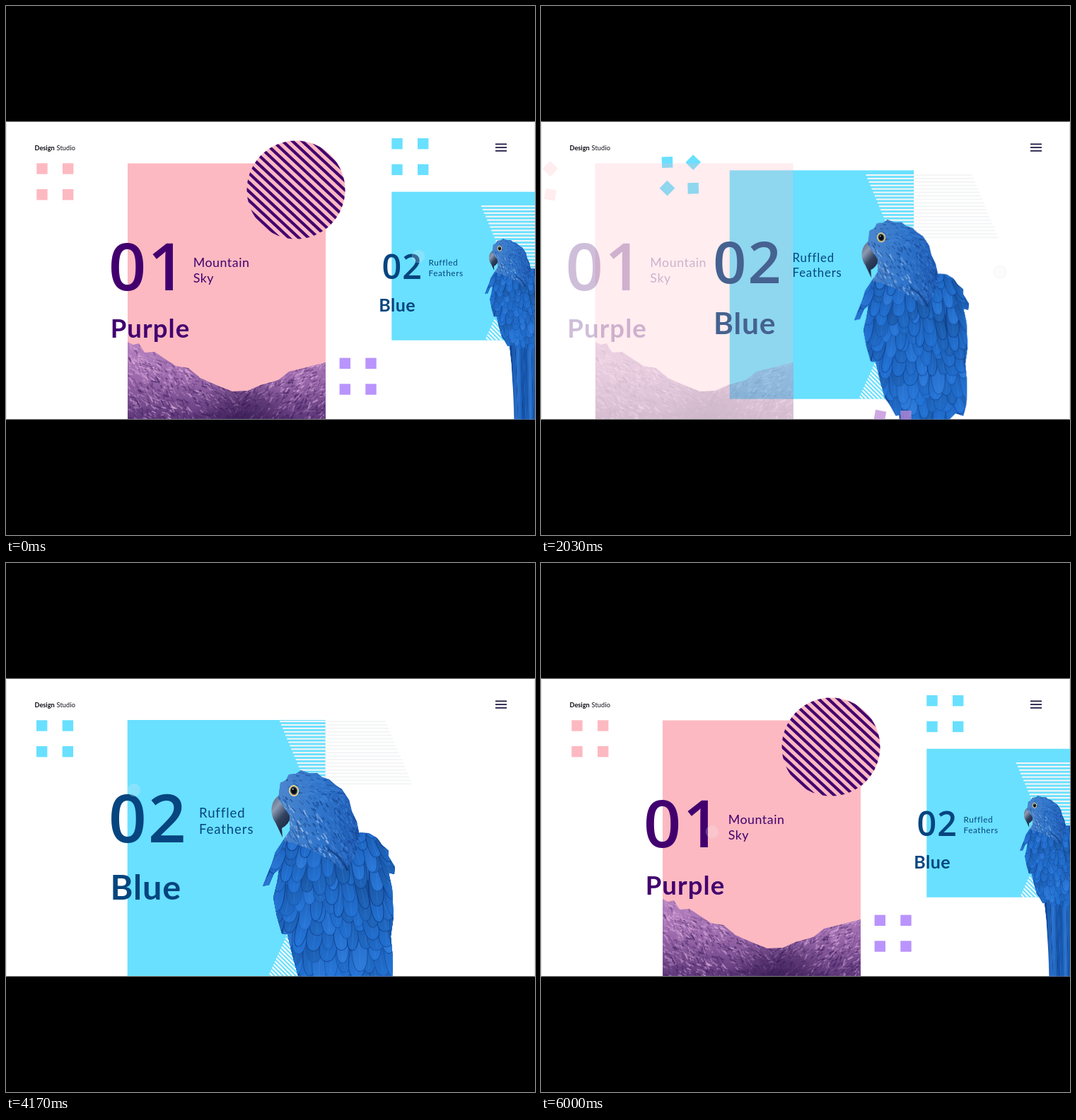
These frames come from a looping animation (748 px wide and 748 px high, 6030 ms). An HTML page with a canvas:

```html
<!DOCTYPE html>
<html lang="en">
<head>
<meta charset="utf-8">
<title>Colour slides</title>
<style>
html, body { margin: 0; width: 100%; height: 100%; overflow: hidden; background: #000 }
canvas { display: block }
</style>
</head>
<body>
<canvas id="stage" width="748" height="748"></canvas>
<script>
const ctx = document.getElementById('stage').getContext('2d');
const LOOP = 6030, MOVE = 1319;
const PINK = '#fdb9c1', CYAN = '#69e0ff', PURPLE = '#42006f', NAVY = '#06457f';

const clamp = v => Math.max(0, Math.min(1, v));
const mix = (a, b, k) => a + (b - a) * k;
const ease = u => u < .5 ? 8 * u ** 4 : 1 - 8 * (1 - u) ** 4;

function seeded(seed) {
  return () => {
    seed = (seed * 1664525 + 1013904223) % 4294967296;
    return seed / 4294967296;
  };
}

function picture(w, h, draw) {
  const c = document.createElement('canvas');
  c.width = w;
  c.height = h;
  draw(c.getContext('2d'));
  return c;
}

function polygon(g, pts) {
  g.beginPath();
  for (let i = 0; i < pts.length; i += 2) g.lineTo(pts[i], pts[i + 1]);
  g.closePath();
}

function line(g, x1, y1, x2, y2) {
  g.beginPath();
  g.moveTo(x1, y1);
  g.lineTo(x2, y2);
  g.stroke();
}

function ramp(g, x1, y1, x2, y2, ...colors) {
  const r = g.createLinearGradient(x1, y1, x2, y2);
  colors.forEach((c, i) => r.addColorStop(i / (colors.length - 1), c));
  return r;
}

const mountain = picture(280, 112, g => {
  const rnd = seeded(7);
  const ridge = [0,3, 8,7, 16,5, 24,18, 38,17, 53,27, 68,37, 86,40, 103,54, 123,63, 148,73,
    170,72, 188,64, 213,57, 228,45, 253,39, 268,35, 280,32];
  polygon(g, [...ridge, 280, 113, 0, 113]);
  g.clip();
  g.fillStyle = ramp(g, 0, 0, 0, 113, '#b884c0', '#9a68ab', '#5d3779');
  g.fillRect(0, 0, 280, 113);
  for (let i = 0; i < 2000; i++) {
    const x = rnd() * 280, y = rnd() * 113, len = 2 + rnd() * 8;
    const side = x < 155 ? 1 : -1;
    const shade = y / 113 * .5 + .35 - Math.abs(x - 165) / 700;
    const a = .15 + rnd() * .4;
    g.strokeStyle = rnd() < shade ? `rgba(58,28,88,${a})` : `rgba(229,180,226,${a})`;
    g.lineWidth = .6 + rnd() * 1.8;
    const tilt = .1 + rnd() * 1.2;
    line(g, x, y, x + side * len * Math.cos(tilt), y + len * Math.sin(tilt));
  }
  const dark = g.createRadialGradient(165, 125, 5, 165, 125, 75);
  dark.addColorStop(0, 'rgba(48,22,75,.75)');
  dark.addColorStop(1, 'rgba(48,22,75,0)');
  g.fillStyle = dark;
  g.fillRect(0, 0, 280, 113);
});

const parrot = picture(190, 560, g => {
  const rnd = seeded(21);
  // tail
  polygon(g, [70,290, 79,372, 85,470, 88,560, 157,560, 156,470, 152,372, 158,290]);
  g.fillStyle = ramp(g, 78, 0, 156, 0, '#0f489c', '#2a74d0', '#1250a6', '#2a74d0', '#0d4290');
  g.fill();
  for (let i = 0; i < 9; i++) {
    g.strokeStyle = i % 2 ? 'rgba(8,35,90,.6)' : 'rgba(80,150,225,.45)';
    line(g, 82 + i * 8, 300, 92 + i * 7.5, 560);
  }
  // beak
  g.beginPath();
  g.moveTo(26, 34);
  g.bezierCurveTo(12, 40, 8, 60, 18, 74);
  g.lineTo(28, 95);
  g.lineTo(27, 82);
  g.quadraticCurveTo(38, 76, 40, 64);
  g.lineTo(40, 40);
  g.fillStyle = ramp(g, 10, 42, 42, 70, '#5a6a85', '#8c9bb2', '#33435f', '#1c2c49');
  g.fill();
  g.save();
  polygon(g, [22,40, 25,18, 33,14, 37,6, 47,5, 54,0, 65,4, 77,4, 84,10, 94,13, 103,21, 112,27,
    122,42, 126,58, 133,73, 136,88, 150,89, 162,96, 168,105, 178,114, 178,122, 187,137, 186,147,
    178,145, 183,167, 185,207, 181,235, 184,265, 183,300, 178,320, 165,316, 154,327, 143,326,
    129,331, 116,322, 100,329, 84,316, 68,320, 58,302, 50,291, 42,262, 35,232, 27,231, 20,207,
    15,180, 20,160, 23,140, 16,146, 9,162, 0,164, 13,132, 18,116, 29,99, 38,86, 38,64, 29,50]);
  g.clip();
  g.fillStyle = ramp(g, 0, 0, 60, 330, '#2c6fc4', '#2168c6', '#1a5ab4');
  g.fillRect(0, 0, 190, 340);
  // wing feathers, lower rows first
  for (let y = 300; y > 82; y -= 15) {
    const k = (y - 82) / 218;
    for (let x = rnd() * 16; x < 196; x += 14 + rnd() * 10) {
      const w = (10 + k * 4) * (.8 + rnd() * .4), len = (30 + k * 46) * (.75 + rnd() * .5);
      g.save();
      g.translate(x, y + rnd() * 16 - 8);
      g.rotate((95 - x) / 95 * (.5 - k * .5) + (rnd() - .5) * .35);
      g.beginPath();
      g.moveTo(-w * .6, -len * .5);
      g.bezierCurveTo(-w, len * .2, -w * .8, len * .5, 0, len * .5);
      g.bezierCurveTo(w * .8, len * .5, w, len * .2, w * .6, -len * .5);
      const l = 40 + rnd() * 10;
      g.fillStyle = ramp(g, -w, -len / 2, w, len / 2, `hsl(214 74% ${l - 7}%)`, `hsl(213 72% ${l + 3}%)`);
      g.fill();
      g.strokeStyle = `rgba(10,45,115,${.15 + rnd() * .5})`;
      g.lineWidth = 1.1;
      g.stroke();
      g.strokeStyle = 'rgba(100,165,235,.2)';
      line(g, 0, -len * .3, 0, len * .42);
      g.restore();
    }
  }
  // head and neck down
  const neck = () => {
    g.beginPath();
    g.moveTo(20, 0);
    g.lineTo(140, 0);
    g.lineTo(138, 92);
    g.quadraticCurveTo(130, 135, 112, 140);
    g.quadraticCurveTo(65, 105, 28, 100);
    g.closePath();
  };
  neck();
  g.fillStyle = ramp(g, 30, 60, 135, 60, '#4a84cc', '#2f74cb', '#1d59b2');
  g.fill();
  g.save();
  neck();
  g.clip();
  for (let i = 0; i < 800; i++) {
    const x = 20 + rnd() * 118, y = rnd() * 140;
    const pale = y > 42 && x < 75 + (y - 42) * .3;
    const tone = rnd();
    g.strokeStyle = tone < .4 ? 'rgba(14,58,130,.5)'
      : pale && tone > .65 ? 'rgba(195,215,238,.55)' : 'rgba(70,140,222,.5)';
    g.lineWidth = .8 + rnd() * 1.2;
    const dir = y < 35 ? .2 : .8 + rnd() * .4;
    const len = 3 + rnd() * 5;
    line(g, x, y, x + len * Math.cos(dir), y + len * Math.sin(dir));
  }
  g.restore();
  g.strokeStyle = 'rgba(8,32,85,.5)';
  g.lineWidth = 3;
  g.beginPath();
  g.moveTo(92, 112);
  g.quadraticCurveTo(110, 120, 120, 142);
  g.stroke();
  g.restore();
  // eye
  for (const [rx, ry, color] of [[7, 8, '#ead98a'], [5.2, 6, '#46515c'], [3.8, 4.6, '#060b18']]) {
    g.beginPath();
    g.ellipse(44, 29, rx, ry, -.2, 0, 7);
    g.fillStyle = color;
    g.fill();
  }
  g.fillStyle = '#fff';
  g.fillRect(42, 26, 1.5, 1.5);
});

function text(str, x, y, size, color, weight = 400, spacing = 0, family = 'Lato') {
  ctx.font = `${weight} ${size}px "${family}", sans-serif`;
  ctx.letterSpacing = spacing * size + 'px';
  ctx.fillStyle = color;
  ctx.fillText(str, x, y);
}
const digits = (str, x, y, size, color) => text(str, x - size * .032, y, size, color, 600, .025, 'Open Sans');

// four squares around fixed centres, each with its own turn in degrees
function squares(x, y, color, turns, p) {
  ctx.fillStyle = color;
  turns.forEach((turn, i) => {
    ctx.save();
    ctx.translate(x + i % 2 * 36.7, y + (i >> 1) * 36.7);
    ctx.rotate(turn * p * Math.PI / 180);
    ctx.fillRect(-7.7, -7.7, 15.4, 15.4);
    ctx.restore();
  });
}

function blueSlide(p) {
  const x = mix(545.3, 171.7, p), y = mix(262.7, 222, p), w = mix(203, 280, p), h = mix(210, 362, p);
  const s = mix(.476, 1, p);
  ctx.fillStyle = CYAN;
  ctx.fillRect(x, y, w, h);
  squares(mix(553, 50.7, p), mix(194.7, 230, p), CYAN, [360, 180, 180, 360], p);

  ctx.fillStyle = '#f4f5f6';
  const lx = mix(672, 387, p), ly = mix(282, 223, p);
  for (let d = 0; d < 89; d += 4.9) ctx.fillRect(lx + d * .42, ly + d, 150, 2.1);

  const tx = mix(677, 371, p), ty = y + h;
  ctx.save();
  polygon(ctx, [tx, ty, tx + 29 * s, ty - 64 * s, tx + 75 * s, ty]);
  ctx.clip();
  ctx.strokeStyle = '#fff';
  ctx.lineWidth = 2;
  for (let d = -70; d < 80; d += 6) line(ctx, tx + d, ty - 70, tx + d + 70, ty);
  ctx.restore();

  digits('02', mix(533, 148, p), mix(385.5, 394.5, p), mix(48.5, 94, p), NAVY);
  text('Blue', mix(527.3, 147.5, p), mix(431.5, 475.5, p), mix(25, 48.5, p), NAVY, 700, .02);
  const size = mix(11.8, 18.5, p), fx = mix(597.4, 273, p), fy = mix(366.5, 360, p);
  text('Ruffled', fx, fy, size, NAVY, 400, .05);
  text('Feathers', fx, fy + mix(15, 23, p), size, NAVY, 400, .05);

  ctx.drawImage(parrot, mix(677, 363, p), mix(329, 293, p), 190 * s, 560 * s);
}

function disc(p) {
  const k = 1 - p;
  ctx.save();
  ctx.globalAlpha = clamp(Math.min(k, (.74 - p) * 3));
  ctx.translate(mix(410, 447, p), mix(260, 583, p));
  ctx.scale(k, k);
  ctx.beginPath();
  ctx.arc(0, 0, 69.5, 0, 7);
  ctx.clip();
  ctx.fillStyle = PINK;
  ctx.fillRect(-70, -70, 140, 140);
  ctx.rotate(.75);
  ctx.fillStyle = PURPLE;
  for (let y = -68; y < 70; y += 9.4) ctx.fillRect(-70, y, 140, 4.2);
  ctx.restore();
}

function purpleSlide(p) {
  const x = 172 - 128 * p, shift = -148 * p;
  ctx.globalAlpha = 1 - p;
  ctx.fillStyle = PINK;
  ctx.fillRect(x, 222.5, 280, 361.5);
  ctx.drawImage(mountain, x, 472);
  squares(51 - 100 * p, 230, PINK, [45, 180, 180, 135], p);
  digits('01', 148 + shift, 401.5, 93, PURPLE);
  text('Purple', 147.7 + shift, 468.5, 36.5, PURPLE, 700, .03);
  text('Mountain', 264.7 + shift, 369, 17.8, PURPLE, 400, .03);
  text('Sky', 264.7 + shift, 391, 17.8, PURPLE, 400, .03);
  ctx.globalAlpha = 1;
  disc(p);
  const k = clamp(p * 2.5 - .2);
  const violet = `rgba(${mix(185, 191, k)},${mix(148, 139, k)},${mix(252, 216, k)},${mix(1, .75, k)})`;
  squares(479.3, 505.3 + 100 * p, violet, [135, 0, 0, 135], p);
}

// time, x, y of the pointer
const trail = [[0, 583, 354], [900, 649, 376], [3100, 649, 376], [4170, 181, 321],
  [4700, 77, 254], [5300, 77, 254], [5950, 242, 380], [LOOP, 242, 380]];

function pointer(t) {
  const i = trail.findIndex(k => k[0] > t);
  const [a, b] = [trail[i - 1], trail[i]];
  const u = (t - a[0]) / (b[0] - a[0]), k = u * u * (3 - 2 * u);
  ctx.beginPath();
  ctx.arc(mix(a[1], b[1], k), mix(a[2], b[2], k), 8.7, 0, 7);
  ctx.fillStyle = 'rgba(235,235,240,.22)';
  ctx.fill();
  ctx.strokeStyle = 'rgba(215,215,225,.25)';
  ctx.lineWidth = 1;
  ctx.stroke();
}

function frame(now) {
  const t = now % LOOP;
  const p = t < 4000 ? ease(clamp((t - 1269) / MOVE)) : 1 - ease(clamp((t - 4568) / MOVE));
  ctx.fillStyle = '#000';
  ctx.fillRect(0, 0, 748, 748);
  ctx.save();
  ctx.beginPath();
  ctx.rect(0, 163.5, 748, 421);
  ctx.clip();
  ctx.fillStyle = '#fff';
  ctx.fillRect(0, 163, 748, 422);
  ctx.fillStyle = '#e2e2e4';
  ctx.fillRect(0, 163, 1, 422);
  ctx.fillRect(747, 163, 1, 422);
  blueSlide(p);
  purpleSlide(p);
  text('Design', 40.5, 204, 9.2, '#0b0b14', 700);
  text('Studio', 71.5, 204, 9.2, '#0b0b14', 400, .015);
  ctx.fillStyle = '#17123c';
  for (const y of [194.5, 199.2, 204]) ctx.fillRect(692, y, 16, 1.7);
  pointer(t);
  ctx.restore();
  requestAnimationFrame(frame);
}
requestAnimationFrame(frame);
</script>
</body>
</html>
```
